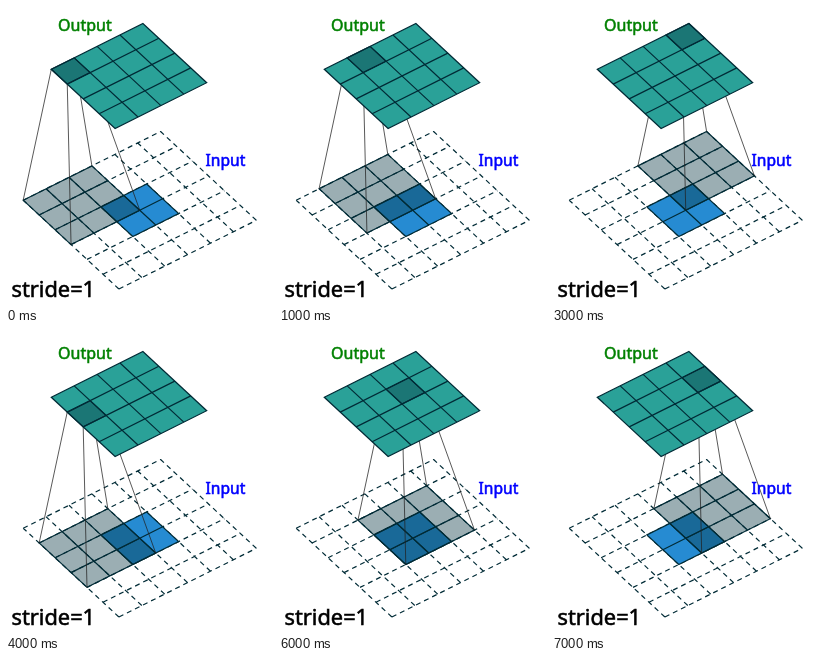
An HTML page that plays this animation: 267 by 300 pixels, repeating every 8 s.

```html
<!DOCTYPE html>
<html lang="en">
<head>
<meta charset="utf-8">
<title>Transposed convolution, stride 1</title>
<style>
html, body { margin: 0; height: 100%; overflow: hidden; background: #fff; }
svg { display: block; width: 100vw; height: 100vh; }
path { stroke: #002b36; stroke-width: 1.2; fill: none; }
#padding { stroke-dasharray: 5 4; }
#input { fill: #268bd2; }
#output { fill: #2aa198; }
#kernel, #cell { fill: #073642; fill-opacity: .4; }
#rays { stroke: #222; stroke-width: .75; }
text { font: 16px "Noto Sans", "Open Sans", sans-serif; stroke: currentColor; fill: currentColor; stroke-width: .55; }
</style>
</head>
<body>
<svg viewBox="0 0 267 300">
  <path id="padding"/>
  <path id="input"/>
  <path id="kernel"/>
  <path id="rays"/>
  <path id="output"/>
  <path id="cell"/>
  <text x="52" y="25" color="#008000">Output</text>
  <text x="199.5" y="160" color="#00f" style="font-size:15.6px">Input</text>
  <text x="5.5" y="291" color="#000" style="font-size:21.8px">stride=1</text>
</svg>
<script>
const STEP = 1000, STEPS = 8;
const BASE = [17.2, 194.2], TOP = [45.3, 63.3];

// Projects a grid position (column, row) on a plane to the stage.
const at = ([x, y], col, row) => [x + 22.9 * col + 15.95 * row, y - 11.45 * col + 14.8 * row];

const corners = (plane, col, row, n) =>
  [[0, 0], [n, 0], [n, n], [0, n]].map(([c, r]) => at(plane, col + c, row + r));

const line = (from, to) => `M${from}L${to}`;

// Lines of an n by n block, from edge `first` to edge `last`.
function lines(plane, col, row, n, first, last) {
  let d = "";
  for (let i = first; i <= last; i++) {
    d += line(at(plane, col + i, row + n), at(plane, col + i, row));
    d += line(at(plane, col, row + i), at(plane, col + n, row + i));
  }
  return d;
}

const block = (plane, col, row, n) =>
  `M${corners(plane, col, row, n).join("L")}Z` + lines(plane, col, row, n, 1, n - 1);

const draw = (id, d) => document.getElementById(id).setAttribute("d", d);

draw("padding", lines(BASE, 0, 0, 6, 0, 6));
draw("input", block(BASE, 2, 2, 2));
draw("output", block(TOP, 0, 0, 4));

function frame(now) {
  const step = Math.floor(now / STEP) % STEPS;
  const col = step % 4, row = Math.floor(step / 4);
  const feet = corners(BASE, col, row, 3);
  draw("kernel", block(BASE, col, row, 3));
  draw("cell", block(TOP, col, row, 1));
  draw("rays", corners(TOP, col, row, 1).map((p, i) => line(p, feet[i])).join(""));
  requestAnimationFrame(frame);
}
frame(performance.now());
</script>
</body>
</html>
```
